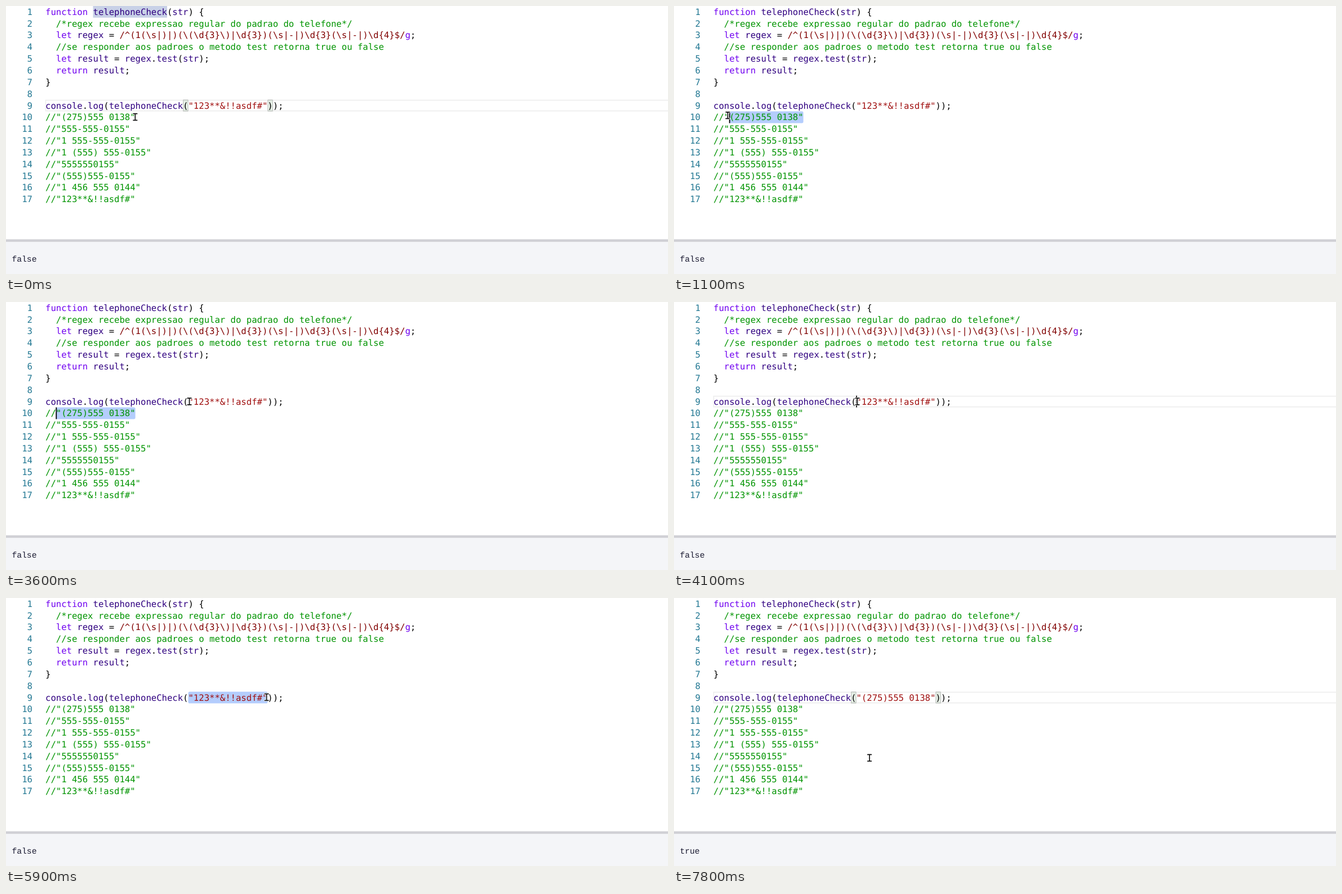
An HTML page with a canvas for the animation above (8000 ms loop, 1175 by 477 pixels).

```html
<!DOCTYPE html>
<html lang="pt">
<head>
<meta charset="utf-8">
<title>Editor</title>
<style>
  html, body { margin: 0; width: 100%; height: 100%; overflow: hidden; background: #fff; }
  canvas { display: block; width: 1175px; height: 477px; }
</style>
</head>
<body>
<canvas id="stage"></canvas>
<script>
const W = 1175, H = 477, LOOP = 8000;
const LEFT = 70, TOP = -0.1, ROW = 20.85, BASE = 15.8;
const CODE_FONT = '15.6px "DejaVu Sans Mono", monospace';
const OUT_FONT = '14.7px "Liberation Mono", monospace';

const canvas = document.getElementById('stage');
const ctx = canvas.getContext('2d');
const ratio = window.devicePixelRatio || 1;
canvas.width = W * ratio;
canvas.height = H * ratio;
// The tiny skew keeps text baselines from snapping to whole pixels.
ctx.setTransform(ratio, 1e-5, 0, ratio, 0, 0);
ctx.textRendering = 'geometricPrecision';
ctx.font = CODE_FONT;
const CHAR = ctx.measureText('0'.repeat(100)).width / 100;

const OLD_ARG = '"123**&!!asdf#"', NEW_ARG = '"(275)555 0138"';
const source = arg => [
  'function telephoneCheck(str) {',
  '  /*regex recebe expressao regular do padrao do telefone*/',
  '  let regex = /^(1(\\s|)|)(\\(\\d{3}\\)|\\d{3})(\\s|-|)\\d{3}(\\s|-|)\\d{4}$/g;',
  '  //se responder aos padroes o metodo test retorna true ou false',
  '  let result = regex.test(str);',
  '  return result;',
  '}',
  '',
  `console.log(telephoneCheck(${arg}));`,
  '//' + NEW_ARG,
  '//"555-555-0155"',
  '//"1 555-555-0155"',
  '//"1 (555) 555-0155"',
  '//"5555550155"',
  '//"(555)555-0155"',
  '//"1 456 555 0144"',
  '//' + OLD_ARG
];

// Groups: comment, regex, string, keyword, identifier, punctuation
const TOKEN = /(\/[*\/].*)|(\/\^.*\$\/)|(".*")|(\b(?:function|let|return)\b|g(?=;))|(\w+)|([^\w"\/]+)/g;
const COLORS = ['#009400', '#800000', '#a01010', '#7000f0', '#300080', '#000'];

const CALL_ROW = 8, COPY_ROW = 9, ARG_START = 27, ARG_END = 42;
const PASTE = 6300, RESULT = 7100, BLINK = 500;
const KEYS = [2800, 3300, PASTE];
const DRAGS = [
  { start: 200, end: 1300, row: COPY_ROW, from: 17 },
  { start: 4100, end: 5400, row: CALL_ROW, from: ARG_START }
];

const MOUSE_START = { x: 229.3, y: 197.5 };
const MOVES = [
  { start: 200, end: 1200, step: 100, x: 91.5, y: 194.5 },
  { start: 3200, end: 3400, step: 200, x: 325.5, y: 189 },
  { start: 3400, end: 3600, step: 200, x: 325.5, y: 177 },
  { start: 4100, end: 5050, step: 250, x: 462.5, y: 176.5 },
  { start: 7400, end: 7700, step: 200, x: 347, y: 284.5 }
];

const colX = col => LEFT + col * CHAR;
const rowY = row => TOP + row * ROW;
const smooth = u => u * u * (3 - 2 * u);

function mouseAt(t) {
  let { x, y } = MOUSE_START;
  for (const move of MOVES) {
    if (t < move.start) break;
    const elapsed = Math.floor((t - move.start) / move.step) * move.step;
    const k = smooth(Math.min(1, elapsed / (move.end - move.start)));
    x += (move.x - x) * k;
    y += (move.y - y) * k;
  }
  return { x, y };
}

function selectionAt(t) {
  const drag = DRAGS.findLast(d => d.start <= t);
  if (!drag || t >= PASTE) return { row: CALL_ROW, from: ARG_END, to: ARG_END, matched: true };
  const { x } = mouseAt(Math.min(t, drag.end));
  return { row: drag.row, from: drag.from, to: Math.round((x - LEFT) / CHAR) };
}

// The caret blinks from the last key press or drag.
function caretVisible(t) {
  const inputs = [
    ...KEYS.filter(key => key <= t),
    ...DRAGS.filter(d => d.start <= t).map(d => Math.min(t, d.end))
  ];
  if (!inputs.length) return false;
  return Math.floor((t - Math.max(...inputs)) / BLINK) % 2 === 0;
}

function box(row, from, to, color, radius = 0) {
  ctx.fillStyle = color;
  ctx.beginPath();
  ctx.roundRect(colX(from), rowY(row), (to - from) * CHAR, ROW, radius);
  ctx.fill();
}

function lineFrame(row) {
  ctx.strokeStyle = '#eee';
  ctx.lineWidth = 1.7;
  ctx.strokeRect(LEFT + 0.4, rowY(row) + 0.85, W, ROW - 1.7);
}

function bracket(col) {
  box(CALL_ROW, col, col + 1, 'rgba(0,100,0,0.1)');
  ctx.strokeStyle = '#b9b9b9';
  ctx.lineWidth = 0.9;
  ctx.strokeRect(colX(col) + 0.45, rowY(CALL_ROW) + 0.45, CHAR - 0.9, ROW - 0.9);
}

function drawCode(lines) {
  ctx.font = CODE_FONT;
  lines.forEach((line, row) => {
    const y = rowY(row) + BASE;
    ctx.fillStyle = '#237893';
    ctx.textAlign = 'right';
    ctx.fillText(row + 1, 47, y);
    ctx.textAlign = 'left';
    for (const match of line.matchAll(TOKEN)) {
      ctx.fillStyle = COLORS[match.slice(1).findIndex(Boolean)];
      ctx.fillText(match[0], colX(match.index), y);
    }
  });
}

function drawOutput(text) {
  ctx.fillStyle = '#f4f5f8';
  ctx.fillRect(0, 417, W, H - 417);
  ctx.fillStyle = '#d0d0d5';
  ctx.fillRect(0, 415.3, W, 4.35);
  ctx.font = OUT_FONT;
  ctx.fillStyle = '#1b1b32';
  ctx.fillText(text, 10.4, 454.7);
}

function drawMouse({ x, y }) {
  ctx.beginPath();
  for (const end of [y - 5.8, y + 5.8]) {
    ctx.moveTo(x - 3.3, end);
    ctx.lineTo(x + 3.3, end);
  }
  ctx.moveTo(x, y - 5.8);
  ctx.lineTo(x, y + 5.8);
  ctx.lineCap = 'round';
  for (const [color, width] of [['#fff', 3.4], ['#111', 1.7]]) {
    ctx.strokeStyle = color;
    ctx.lineWidth = width;
    ctx.stroke();
  }
  ctx.lineCap = 'butt';
}

function draw(t) {
  const { row, from, to, matched } = selectionAt(t);

  ctx.fillStyle = '#fff';
  ctx.fillRect(0, 0, W, H);
  if (t < DRAGS[0].start) box(0, 9, 23, '#c8d1e7');
  if (from === to) lineFrame(row);
  else box(row, Math.min(from, to), Math.max(from, to), '#b4cdfd', 2.6);
  if (matched) {
    bracket(ARG_START - 1);
    bracket(ARG_END);
  }
  drawCode(source(t < PASTE ? OLD_ARG : NEW_ARG));
  drawOutput(t < RESULT ? 'false' : 'true');
  if (caretVisible(t)) {
    ctx.fillStyle = '#000';
    ctx.fillRect(colX(to) - 0.4, rowY(row), 1.8, ROW);
  }
  drawMouse(mouseAt(t));
}

const start = performance.now();
function tick() {
  draw((performance.now() - start) % LOOP);
  requestAnimationFrame(tick);
}
tick();
</script>
</body>
</html>
```
